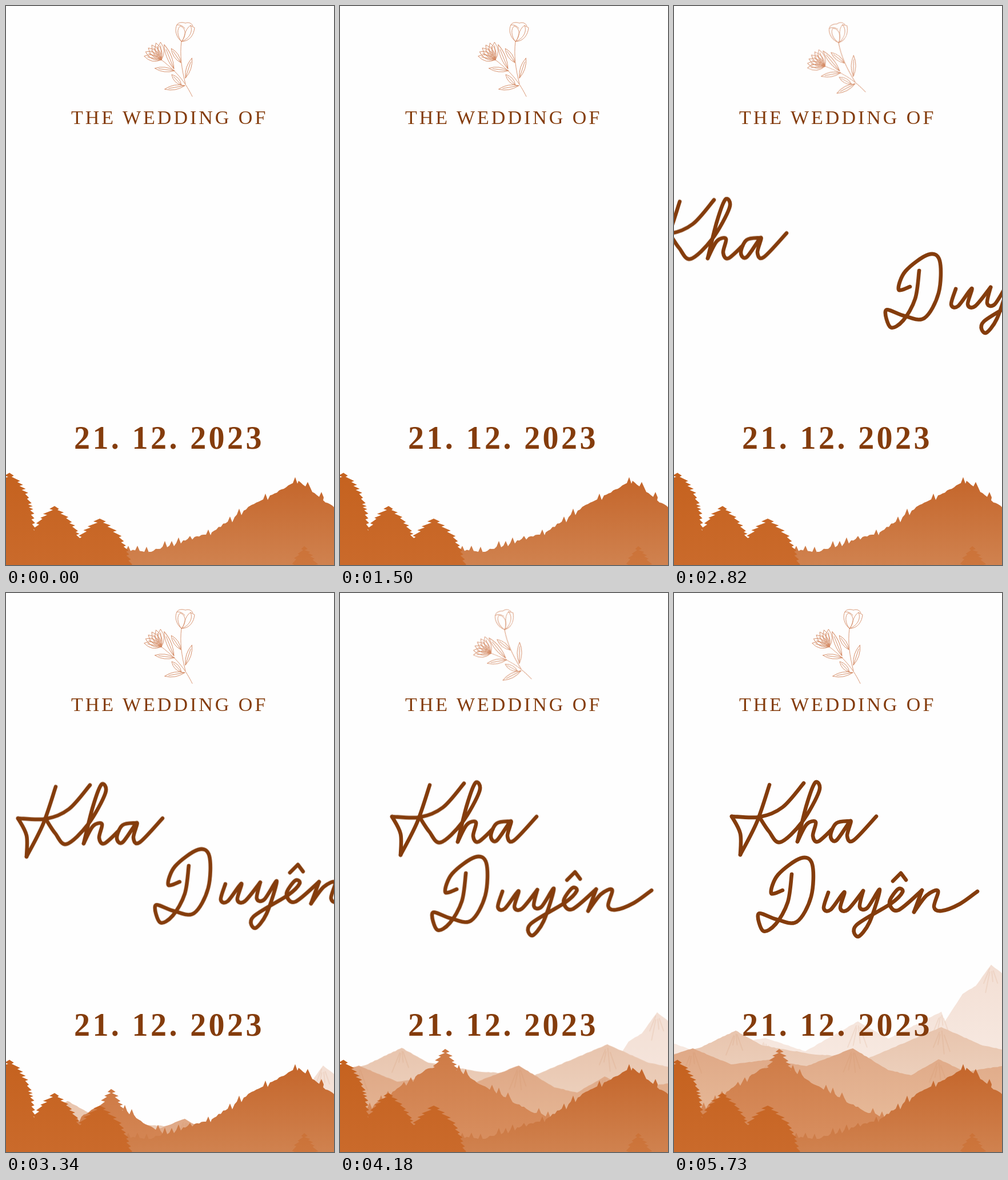
An HTML page that plays this animation: 574 by 976 pixels, repeating every 5.98 s.

```html
<!DOCTYPE html>
<html lang="en">
<head>
<meta charset="utf-8">
<title>Wedding invitation</title>
<style>
  html, body { margin: 0; width: 100%; height: 100%; overflow: hidden; background: #fefefe; }
  svg { display: block; width: 574px; height: 976px; }
  text { font-family: "Liberation Serif", "Noto Serif", serif; fill: #843c0c; }
  .heading { font-size: 34px; letter-spacing: 4px; }
  .date { font-size: 56px; font-weight: bold; letter-spacing: 4.4px; }
  .line { fill: none; stroke-linecap: round; stroke-linejoin: round; }
  .name { stroke: #843c0c; stroke-width: 6.6; animation: slide 3140ms linear 1500ms both; }
  #flower { stroke: #d58d67; stroke-width: .9; }
  .crease { stroke: #c98257; stroke-opacity: .13; stroke-width: 2; }

  .groom { --enter: translate(-375px, 9px); --slow: translate(-157px, 6.5px); }
  .bride { --enter: translate(530px, -36px); --slow: translate(223px, -29px); }
  @keyframes slide {
    from { transform: var(--enter); }
    42.04% { transform: var(--slow); animation-timing-function: cubic-bezier(.3333, .6667, .6667, 1); }
    to { transform: none; }
  }

  /* The ranges rise at one speed and settle one after another. */
  .range { animation: rise calc(var(--drop) * 9.05ms) linear 2100ms both; }
  .near { --drop: 207; }
  .middle { --drop: 260; }
  .far { --drop: 313; }
  @keyframes rise {
    from { transform: translateY(calc(var(--drop) * 1px)); }
    to { transform: none; }
  }
</style>
</head>
<body>
<svg viewBox="0 0 574 976">
  <defs>
    <linearGradient id="farFill" gradientUnits="userSpaceOnUse" x1="0" y1="650" x2="0" y2="820">
      <stop offset="0" stop-color="#f3dfd4"/><stop offset="1" stop-color="#f7e9e1"/>
    </linearGradient>
    <linearGradient id="paleFill" gradientUnits="userSpaceOnUse" x1="0" y1="758" x2="0" y2="840">
      <stop offset="0" stop-color="#e8c4ad"/><stop offset="1" stop-color="#eccfbb"/>
    </linearGradient>
    <linearGradient id="middleFill" gradientUnits="userSpaceOnUse" x1="0" y1="795" x2="0" y2="910">
      <stop offset="0" stop-color="#dfa886"/><stop offset="1" stop-color="#e6b897"/>
    </linearGradient>
    <linearGradient id="nearFill" gradientUnits="userSpaceOnUse" x1="0" y1="796" x2="0" y2="960">
      <stop offset="0" stop-color="#ce7a45"/><stop offset="1" stop-color="#d88f60"/>
    </linearGradient>
    <linearGradient id="hillFill" gradientUnits="userSpaceOnUse" x1="0" y1="822" x2="0" y2="976">
      <stop offset="0" stop-color="#c4652a"/><stop offset="1" stop-color="#d0824f"/>
    </linearGradient>
    <linearGradient id="treeFill" gradientUnits="userSpaceOnUse" x1="0" y1="815" x2="0" y2="976">
      <stop offset="0" stop-color="#c5621f"/><stop offset="1" stop-color="#ca6a2b"/>
    </linearGradient>
  </defs>

  <g class="range far" fill="url(#farFill)">
    <g data-ridge="0,787 30,797 160,777 230,800 322,748 375,778 468,731 474,748 505,700 528,686 555,649 574,664"></g>
  </g>
  <g class="range middle">
    <g fill="url(#paleFill)" data-ridge="0,805 45,794 108,764 155,790 240,805 340,812 468,758 540,790 574,797"></g>
    <g fill="url(#middleFill)" data-ridge="0,806 33,795 100,823 165,815 232,826 313,795 375,833 415,842 463,814 510,836 574,826"></g>
  </g>
  <g class="range near" fill="url(#nearFill)">
    <g data-conifer="184,796,36"></g>
    <g data-ridge="40,905 150,832 184,822 250,860 340,908 574,965" data-trees=".14"></g>
  </g>
  <g fill="url(#hillFill)">
    <g data-ridge="150,944 250,953 310,933 360,919 430,871 512,829 555,863 574,875" data-trees=".2"></g>
  </g>
  <g fill="url(#treeFill)">
    <g data-conifer="522,943,36" opacity=".5"></g>
    <g data-conifer="6,815,48"></g>
    <g data-conifer="85,873,55"></g>
    <g data-conifer="164,895,62"></g>
  </g>

  <g id="flower" class="line">
    <path d="M326 158C315 136 303 118 272 94M307 62C304 86 307 108 314 136"/>
    <path d="M307 62C297 54 295 41 299 33Q307 32 313 39M307 62C299 52 299 39 305 35C314 38 317 51 307 62C313 58 312 40 323 34C328 46 319 58 307 62C322 62 329 49 330 38L323 34M299 33C301 28 310 28 314 30C318 28 325 29 327 35"/>
    <g id="leaves"></g>
  </g>
  <text class="heading" x="114" y="206">THE WEDDING OF</text>

  <g class="line name groom" role="img" aria-label="Kha">
    <path data-pen="167,335 145,400 116,457"/>
    <path data-pen="116,457 116,420 101,390"/>
    <path data-pen="101,390 150,391 190,374 227,332"/>
    <path data-pen="150,392 166,416 186,435 224,400 254,346 247,331 232,370 216,434"/>
    <path data-pen="216,434 232,404 248,400 243,424 252,434 277,412"/>
    <path data-pen="308,398 284,402 274,424 284,432 309,398 303,424 314,432 354,390"/>
  </g>
  <g class="line name bride" role="img" aria-label="Duyên">
    <path data-pen="206,491 199,540 178,578 156,590 148,560 180,570 215,574 240,530 242,474 222,463 182,492 170,524 190,519"/>
    <path data-pen="270,523 262,550 274,553 298,522 291,550 304,553 331,520"/>
    <path data-pen="331,520 325,548 338,550 360,518 342,575 322,600 319,580 380,542 400,522 392,517 377,540 392,554 434,519"/>
    <path data-pen="434,519 420,557"/>
    <path data-pen="420,557 442,528 462,520 455,548 468,555 500,543 531,521"/>
    <path d="M383 503L397 489L406 501"/>
  </g>
  <text class="date" x="119" y="773">21. 12. 2023</text>
</svg>

<script>
  const LOOP = 5980, MOVE_START = 1500, MOVE_END = 4980, STEP = 40, BEAT = 250, FLOOR = 990;

  function seeded(seed) {
    return () => (seed = (seed * 16807) % 2147483647) / 2147483647;
  }
  const random = seeded(2023);

  const parse = list => list.split(" ").map(pair => pair.split(",").map(Number));
  const polyline = points => "M" + points.map(p => p.map(v => v.toFixed(1)).join(" ")).join("L");
  const each = (selector, draw) => document.querySelectorAll(selector).forEach(draw);

  // A rough skyline through the key points, with small treetops scattered on it.
  function ridgePath(points, density) {
    const out = [];
    points.slice(1).forEach(([x1, y1], i) => {
      const [x0, y0] = points[i];
      out.push([x0, y0]);
      for (let x = x0 + 4; x < x1 - 2; x += 4) {
        const y = y0 + (y1 - y0) * (x - x0) / (x1 - x0) + (random() - .5) * (density ? 3 : 1);
        out.push([x, y]);
        if (random() < density) {
          out.push([x + 4, y - 5 - random() * 6], [x + 8, y + 1]);
          x += 8;
        }
      }
    });
    const [first, last] = [points[0], points[points.length - 1]];
    return polyline([...out, last, [last[0], 1300], [first[0], 1300]]) + "Z";
  }

  // Faint folds fanning down from every summit.
  function creasePath(points) {
    const summits = points.filter(([, y], i) => i && points[i + 1] && y < points[i - 1][1] && y < points[i + 1][1]);
    return summits.flatMap(([x, y]) => [-.4, -.2, .1, .35].map(lean => {
      const top = 6 + random() * 8, length = 15 + random() * 25;
      return polyline([[x + lean * top, y + top], [x + lean * (top + length), y + top + length]]);
    })).join("");
  }

  function coniferPath(x, y, spread) {
    const side = sign => {
      const edge = [];
      for (let d = 5; y + d < FLOOR; d += 5 + random() * 5) {
        const half = spread * (1 - Math.exp(-d / 35));
        edge.push([x + sign * (half + random() * 3), y + d], [x + sign * (half - 2 - random() * 3), y + d + 2]);
      }
      return edge;
    };
    return polyline([[x, y], ...side(1), ...side(-1).reverse()]) + "Z";
  }

  // A smooth pen stroke through the given points.
  function penPath(points) {
    const at = i => points[Math.max(0, Math.min(points.length - 1, i))];
    const handle = (i, sign) => at(i).map((v, k) => v + sign * (at(i + 1)[k] - at(i - 1)[k]) / 6);
    return `M${points[0]}` + points.slice(1)
      .map((p, i) => `C${handle(i, 1)} ${handle(i + 1, -1)} ${p}`).join("");
  }

  function leafPath(x, y, degrees, length, width) {
    const half = length / 2;
    return `<path transform="translate(${x} ${y}) rotate(${degrees})"
      d="M0 0Q${half} ${width} ${length} 0Q${half} ${-width} 0 0H${length * .8}"/>`;
  }

  each("[data-ridge]", g => {
    const points = parse(g.dataset.ridge), density = +(g.dataset.trees || 0);
    g.innerHTML = `<path d="${ridgePath(points, density)}"/>`;
    if (!density) g.innerHTML += `<path class="line crease" d="${creasePath(points)}"/>`;
  });
  each("[data-conifer]", g => {
    g.innerHTML = `<path d="${coniferPath(...parse(g.dataset.conifer)[0])}"/>`;
  });
  each("[data-pen]", path => path.setAttribute("d", penPath(parse(path.dataset.pen))));

  const leaves = [
    [294, 110, -112, 46], [306, 99, -124, 30], [295, 113, 187, 35],
    [314, 126, -72, 37], [307, 138, 227, 25], [313, 139, 170, 36]
  ].map(([x, y, degrees, length]) => leafPath(x, y, degrees, length, 8));
  const petals = Array.from({ length: 6 }, (_, i) => leafPath(272, 94, 192 + i * 15, 31, 11));
  document.getElementById("leaves").innerHTML = [...leaves, ...petals].join("");

  const flower = document.getElementById("flower");
  const tilted = "translate(9px, -8px) translate(326px, 158px) rotate(-17.5deg) translate(-326px, -158px)";
  const motions = document.getAnimations();
  motions.forEach(motion => motion.pause());

  // The flower sways evenly, slightly faster while everything moves.
  function beatAt(t) {
    if (t < MOVE_START) return Math.floor(t / BEAT);
    if (t >= MOVE_END) return 21 + Math.floor((t - MOVE_END) / BEAT);
    return 6 + Math.floor((Math.floor((t - MOVE_START) / STEP) + .5) / 5.8);
  }

  function render(t) {
    const moving = t >= MOVE_START && t < MOVE_END;
    const held = moving ? t - (t - MOVE_START) % STEP : t;
    motions.forEach(motion => { motion.currentTime = held; });
    flower.style.transform = beatAt(t) % 2 ? tilted : "none";
  }

  let start;
  function tick(now) {
    start ??= now;
    render((now - start) % LOOP);
    requestAnimationFrame(tick);
  }
  render(0);
  requestAnimationFrame(tick);
</script>
</body>
</html>
```
